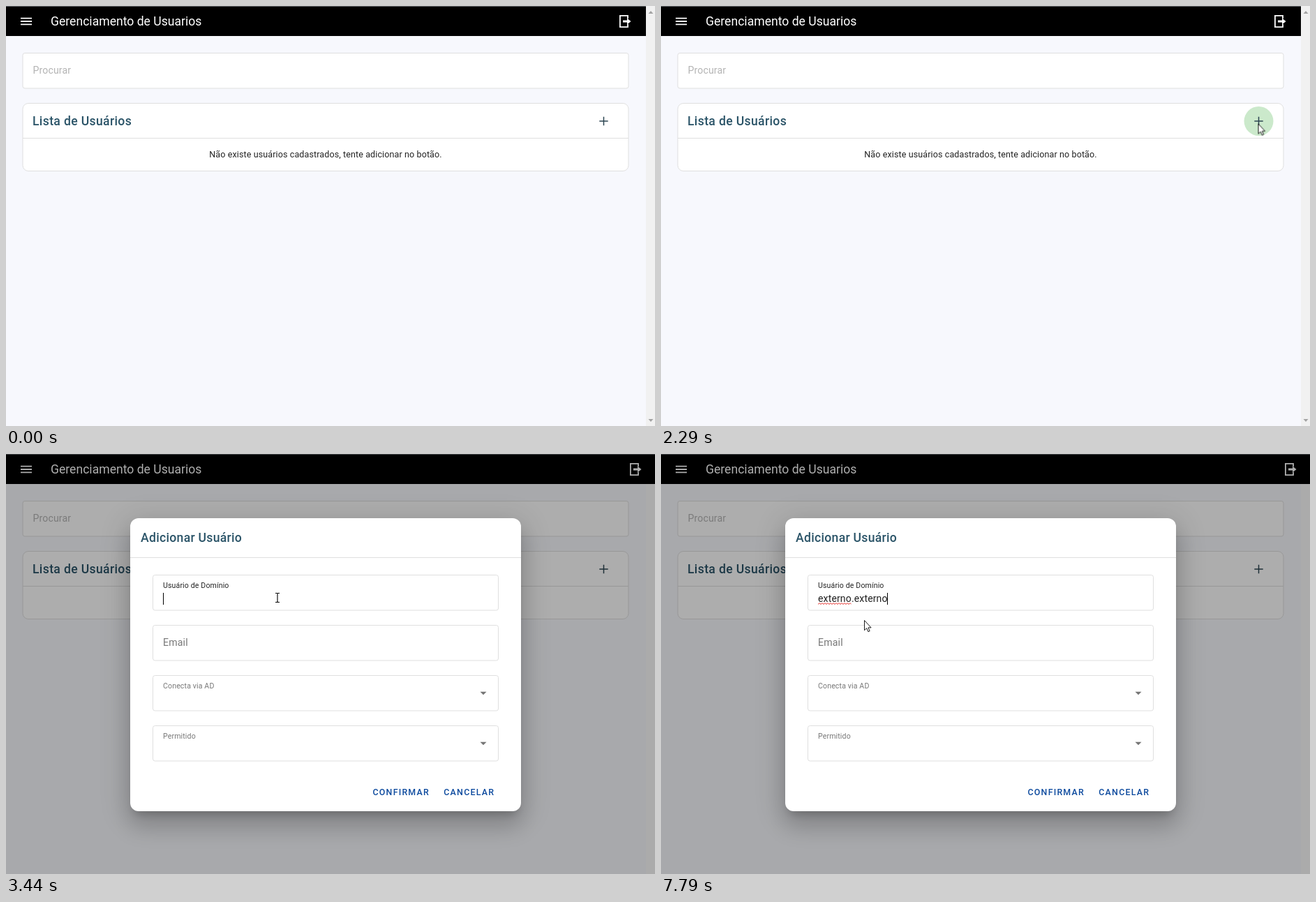
Write an HTML page that moves like this. It is 930x602 px and loops after 8 s.

```html
<!DOCTYPE html>
<html lang="pt-BR">
<head>
<meta charset="utf-8">
<title>Gerenciamento de Usuarios</title>
<style>
html, body { margin: 0; width: 100%; height: 100%; overflow: hidden; background: #fcfcfc; }
#stage { position: relative; width: 930px; height: 602px; overflow: hidden; }
#stage > * { position: absolute; }
svg { display: block; font-family: Roboto, Arial, sans-serif; }
#page, #scrim, #pointer { left: 0; top: 0; width: 930px; height: 602px; }

.bar { font-size: 17.6px; fill: #fff; }
.head { font-size: 17.6px; font-weight: 500; fill: #2b5468; }
.note { font-size: 12.5px; letter-spacing: .12px; fill: #222; }
.label { font-size: 14.1px; letter-spacing: .18px; fill: #777; }
.typed { font-size: 14.05px; letter-spacing: .13px; fill: #222; white-space: pre; }
.action { font-size: 12.4px; font-weight: 500; letter-spacing: 1.23px; fill: #0d4a9e; }
.box { fill: #fff; stroke: #dfdfdf; }
.icon { fill: none; stroke: #fff; stroke-width: 1.8; }

#scrim { background: #000; }
#dialog {
  left: 178px; top: 92px; width: 560px; height: 420px;
  border-radius: 12px; background: #fff;
  box-shadow: 0 10px 13px -6px rgba(0,0,0,.2), 0 21px 33px 3px rgba(0,0,0,.14), 0 8px 40px 7px rgba(0,0,0,.12);
}

/* 1% = 80 ms */
.anim { animation: 8s step-end infinite; }
#scrim { animation-name: dim; }
#dialog { animation-name: open; }
#track { animation-name: track; }
#exit { animation-name: exit; }
#hover { animation-name: hover; }
#mouse { animation-name: move; }
#arrow { animation-name: arrow; }
#beam { animation-name: beam; }
#float { animation-name: rise; }
#caret { animation-name: blink; }
#spell { animation-name: spell; }

@keyframes dim {
  0% { opacity: 0 } 29.625% { opacity: .145 } 30.5% { opacity: .285 }
  31.5% { opacity: .31 } 32.5%, 100% { opacity: .32 }
}
@keyframes open {
  0% { opacity: 0; transform: scale(.7) }
  29.625% { opacity: .8; transform: scale(.979) }
  30.5% { opacity: .98; transform: scale(.9966) }
  31.5%, 100% { opacity: 1; transform: none }
}
@keyframes track { 0% { opacity: 1 } 29.625%, 100% { opacity: 0 } }
@keyframes exit { 0% { transform: none } 29.625%, 100% { transform: translate(15px, 0) } }
@keyframes hover {
  0% { fill: #fff } 24.625% { fill: #f1f9f1 } 25.5% { fill: #e8f5e9 }
  28.625% { fill: #cbe9cb } 30.5% { fill: #e6f5e8 } 32.5%, 100% { fill: #fff }
}
@keyframes move {
  0% { transform: translate(-40px, -40px) }
  .875% { transform: translate(790px, 585px) }
  1.875% { transform: translate(752px, 528px) }
  2.75% { transform: translate(690px, 452px) }
  3.75% { transform: translate(610px, 365px) }
  4.625% { transform: translate(525px, 278px) }
  5.625% { transform: translate(440px, 195px) }
  6.5% { transform: translate(365px, 125px) }
  7.5% { transform: translate(305px, 62px) }
  8.375% { transform: translate(262px, 37px) }
  9.375% { transform: translate(240px, 58px) }
  10.25% { transform: translate(228px, 93px) }
  11.125% { transform: translate(222px, 95px) }
  12.125% { transform: translate(216px, 97px) }
  13.125% { transform: translate(213px, 98px) }
  17% { transform: translate(290px, 107px) }
  18% { transform: translate(480px, 137px) }
  18.875% { transform: translate(680px, 165px) }
  19.875% { transform: translate(814px, 178px) }
  21.75% { transform: translate(893px, 167px) }
  22.75% { transform: translate(882px, 169px) }
  23.625% { transform: translate(870px, 170px) }
  24.625% { transform: translate(860px, 169px) }
  25.5% { transform: translate(855.5px, 168.5px) }
  32.5% { transform: translate(805px, 172px) }
  33.5% { transform: translate(712px, 180px) }
  34.5% { transform: translate(605px, 190px) }
  35.5% { transform: translate(515px, 198px) }
  36.375% { transform: translate(452px, 203px) }
  37.375% { transform: translate(415px, 205px) }
  38.375% { transform: translate(396px, 206px) }
  39.25% { transform: translate(389px, 206px) }
  68.375% { transform: translate(382px, 222px) }
  69.25% { transform: translate(362px, 262px) }
  70.25% { transform: translate(336px, 291px) }
  71.25% { transform: translate(312px, 286px) }
  72.125% { transform: translate(298px, 262px) }
  73%, 100% { transform: translate(291px, 238px) }
}
@keyframes arrow {
  0% { opacity: 1 } 10.25% { opacity: 0 } 18% { opacity: 1 }
  34.5% { opacity: 0 } 73%, 100% { opacity: 1 }
}
@keyframes beam {
  0% { opacity: 0 } 10.25% { opacity: 1 } 18% { opacity: 0 }
  34.5% { opacity: 1 } 73%, 100% { opacity: 0 }
}
@keyframes rise {
  0% { transform: translate(225px, 203.5px); fill: #777 }
  41.125% { transform: translate(225px, 195px) scale(.82); fill: #555 }
  43%, 100% { transform: translate(225px, 192px) scale(.75); fill: #222 }
}
@keyframes blink {
  0% { opacity: 0 } 41.125% { opacity: 1 } 48% { opacity: 0 } 53.75% { opacity: 1 }
  68.375% { opacity: 0 } 74.875% { opacity: 1 } 81.75% { opacity: 0 } 83.625%, 100% { opacity: 1 }
}
@keyframes spell { 0% { opacity: 0 } 68.375%, 100% { opacity: 1 } }
</style>
</head>
<body>
<div id="stage">
  <svg id="page" viewBox="0 0 930 602">
    <rect width="917" height="602" fill="#f7f8fd"/>
    <rect width="930" height="43"/>
    <rect width="930" height="1" fill="#5a5f63"/>
    <path class="icon" d="M21 17.6h16M21 22h16M21 26.4h16"/>
    <text class="bar" x="64" y="28">Gerenciamento de Usuarios</text>
    <g id="exit" class="anim">
      <path class="icon" d="M891 18v-4.1h-11.1v16.2H891V26"/>
      <path fill="#fff" d="M884 20.5h6v-3l5.5 4.5-5.5 4.5v-3h-6z"/>
    </g>

    <rect class="box" x="24" y="67.5" width="868" height="50.5" rx="3"/>
    <text class="label" x="38.5" y="97" style="fill:#b4b4b4;letter-spacing:.13px">Procurar</text>

    <rect class="box" x="24" y="139.5" width="868" height="97" rx="8"/>
    <path class="box" d="M24 189.5h868"/>
    <text class="head" x="38" y="171" letter-spacing=".34">Lista de Usuários</text>
    <circle id="hover" class="anim" cx="856.5" cy="165" r="21" fill="#fff"/>
    <path d="M850.3 165h12.4M856.5 158.8v12.4" stroke="#2c4552" stroke-width="1.5"/>
    <text class="note" x="458" y="216.5" text-anchor="middle">Não existe usuários cadastrados, tente adicionar no botão.</text>

    <g id="track" class="anim">
      <rect x="917" width="13" height="602" fill="#f1f1f1"/>
      <path fill="#a3a3a3" d="M920.5 11l3.5-4 3.5 4zM920.5 592l3.5 4 3.5-4z"/>
    </g>
  </svg>

  <div id="scrim" class="anim"></div>

  <div id="dialog" class="anim">
    <svg width="560" height="420" viewBox="178 92 560 420">
      <defs>
        <pattern id="wave" x="225" y="213" width="4" height="3" patternUnits="userSpaceOnUse">
          <path d="M-1 .5L0 2.3 2 .7 4 2.3 5 .5" fill="none" stroke="#e53935"/>
        </pattern>
        <g id="field">
          <rect class="box" x="210.5" y="173.5" width="495" height="50.5" rx="3"/>
        </g>
        <path id="drop" d="M679.5 340.8h9l-4.5 4.5z" fill="#757575"/>
      </defs>
      <text class="head" x="193" y="126" letter-spacing=".28">Adicionar Usuário</text>
      <path class="box" d="M178 148.5h560"/>
      <use href="#field"/>
      <use href="#field" y="72"/>
      <use href="#field" y="144"/>
      <use href="#field" y="216"/>
      <text id="float" class="label anim">Usuário de Domínio</text>
      <text class="label" x="225" y="275.3">Email</text>
      <text class="label" transform="translate(225 335.8) scale(.75)">Conecta via AD</text>
      <text class="label" transform="translate(225 407.8) scale(.75)">Permitido</text>
      <use href="#drop"/>
      <use href="#drop" y="72"/>
      <text id="typed" class="typed" x="225" y="212"></text>
      <rect id="spell" class="anim" x="225" y="213" width="47.5" height="3" fill="url(#wave)"/>
      <rect id="caret" class="anim" x="225" y="199" width="1" height="17"/>
      <text class="action" x="525.5" y="489">CONFIRMAR</text>
      <text class="action" x="627.3" y="489">CANCELAR</text>
    </svg>
  </div>

  <svg id="pointer" viewBox="0 0 930 602">
    <g id="mouse" class="anim">
      <path id="arrow" class="anim" d="M.5.5v14.2l3.2-3 2.2 5 2.2-1-2.2-4.8h4.2z" fill="#fff" stroke="#000" stroke-width=".9"/>
      <path id="beam" class="anim" d="M-3-6.5h2.2L0-5.8.8-6.5H3M0-6V6M-3 6.5h2.2L0 5.8l.8.7H3" fill="none" stroke="#111" stroke-width="1.2"/>
    </g>
  </svg>
</div>
<script>
const LOOP = 8000;
const word = "externo.externo";
const keys = [4300, 4450, 4530, 4700, 4770, 4840, 4910, 6690, 7240, 7320, 7490, 7560, 7640, 7710, 7790];
const typed = document.getElementById("typed");
const caret = document.getElementById("caret");
let start;

function draw(now) {
  start ??= now;
  const t = (now - start) % LOOP;
  const text = word.slice(0, keys.filter(k => k <= t).length);
  if (typed.textContent !== text) {
    typed.textContent = text;
    caret.setAttribute("x", 225 + Math.floor(text ? typed.getComputedTextLength() : 0));
  }
  requestAnimationFrame(draw);
}
requestAnimationFrame(draw);
</script>
</body>
</html>
```
